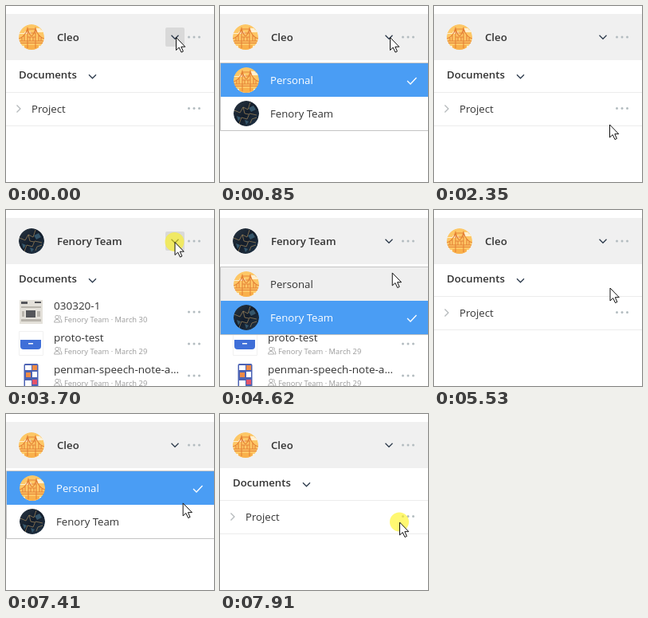
These frames come from a looping animation (261x221 px, 8000 ms). An HTML page:

```html
<!DOCTYPE html>
<html lang="en">
<head>
<meta charset="utf-8">
<title>Account switcher</title>
<style>
html, body { margin: 0; width: 100%; height: 100%; overflow: hidden; background: #fff; }
svg { display: block; width: 261px; height: 221px; font: 13.2px "Open Sans", "Noto Sans", sans-serif; fill: #333; }
.bold { font-weight: 600; }
.file { font-size: 13.5px; }
.note { font-size: 9.4px; fill: #9a9a9a; }
.line { fill: none; stroke: #2d3b4c; stroke-width: 1.3; }
.pale { stroke: #b4b8ba; }
.dots { fill: #b3bcc0; }
.rule { fill: #ececec; }
</style>
</head>
<body>
<svg viewBox="0 0 261 221">
  <defs>
    <clipPath id="disc"><circle r="16"/></clipPath>
    <linearGradient id="night" x2="1" y2="1">
      <stop stop-color="#2a3743"/><stop offset=".5" stop-color="#131d2b"/><stop offset="1" stop-color="#24384a"/>
    </linearGradient>
    <g id="bridge" clip-path="url(#disc)">
      <circle r="16" fill="#fdc766"/>
      <path d="M-16-5h7a3 3 0 0 1 5-2q4 0 4 3h-16zM4-9q1-3 4-2 3-1 4 2h4v3H3zM-16 11H16V16H-16z" fill="#fff0cf"/>
      <path d="M-9 10h18v6H-9z" fill="#f9b04b"/>
      <path d="M-16 5H16M-16 7.5H16M-5-12V14M5-12V14M-5-10H5M-5-5H5M-5 0H5M-16 2Q-8 0-5-11Q0 8 5-11Q8 0 16 2M-12 1V5M-9-2V5M-2 0V5M2 0V5M9-2V5M12 1V5" fill="none" stroke="#e58235" stroke-width="1.1"/>
    </g>
    <g id="marble" clip-path="url(#disc)">
      <circle r="16" fill="url(#night)"/>
      <path d="M-15-4l7 3 4-7 6 3 3-9M-9 13l3-8 7 2 3-7 9 2M-4-8l2 8 5 1M5 12l2-5 6-2" fill="none" stroke="#a58a5c" stroke-width=".7"/>
      <path d="M-12 3l5 2-3 5zM3-7l6-3 3 5-6 3zM-2 8l5 2-3 4z" fill="#35566b"/>
    </g>
    <g id="dots" class="dots"><circle cx="-6.5" r="1.5"/><circle r="1.5"/><circle cx="6.5" r="1.5"/></g>
    <path id="down" class="line" d="M-4.5-2.2L0 2.3 4.5-2.2"/>
    <g id="people" fill="none" stroke="#a5a5a5" stroke-width=".9">
      <circle cx="4" cy="-5.5" r="2.2"/><path d="M.5 1Q.5-2.6 4-2.6T7.5 1zM6.5-7.5q3 .5 1.3 3.6Q10-2.5 10 1H8.5"/>
    </g>
  </defs>

  <path fill="#f0f0f0" d="M0 10H261V68H0z"/>
  <rect id="button" x="200" y="27" width="24" height="24" rx="2" fill="#d9d9d9"/>
  <use href="#down" x="212" y="39"/>
  <use href="#dots" x="236" y="39"/>
  <text class="bold" x="16" y="91">Documents</text>
  <use href="#down" x="108.5" y="88.5"/>

  <g id="own">
    <use href="#bridge" x="32" y="39"/>
    <text class="bold" x="64" y="44">Cleo</text>
    <path class="rule" d="M0 108H261v1H0zM0 150H261v1H0z"/>
    <path class="line pale" d="M13.5 124.5l4.5 4.5-4.5 4.5"/>
    <text x="32" y="134">Project</text>
    <use href="#dots" x="236" y="128.5"/>
  </g>

  <g id="team">
    <use href="#marble" x="32" y="39"/>
    <text class="bold" x="64" y="44">Fenory Team</text>
    <g id="files"></g>
    <path d="M17 113H46V143H17z" fill="#e4e1da"/>
    <path d="M19 115h8v3h-8zM36 115h8v2h-8zM25 126h12v9H25z" fill="#55565a"/>
    <path d="M19 121h25v2H19zM19 137h25v3H19zM20 127h3v7h-3zM39 127h4v7h-4z" fill="#b9b5ad"/>
    <path d="M16.500 152.500H46.500V182.500H16.500z" fill="#fff" stroke="#f1f1f1"/>
    <path d="M18 163H44v8q0 4-4 4H22q-4 0-4-4z" fill="#3f6fd8"/>
    <path d="M28 167h6v1.500h-6z" fill="#fff"/>
    <rect x="22.500" y="193" width="18" height="32" rx="2" fill="#4b62b4"/>
    <path d="M24 195h8v6h-8zM33 203h6v7h-6zM24 214h8v7h-8z" fill="#fff"/>
    <path d="M33 195h6v6h-6zM25 204h6v6h-6z" fill="#ee8a45"/>
    <path d="M33 213h6v6h-6z" fill="#e5546a"/>
  </g>

  <g id="menu">
    <path d="M.5 71.500H262V156.500H.5z" fill="#fff" stroke="#c4c4c4"/>
    <rect id="hover" x="1" width="260" height="42" fill="#efefef"/>
    <rect id="chosen" x="1" width="260" height="42" fill="#4a9df4"/>
    <path id="check" fill="none" stroke="#fff" stroke-width="1.300" d="M235 0l4 4 7.500-8"/>
    <use href="#bridge" x="33" y="93"/>
    <use href="#marble" x="33" y="135"/>
    <text id="row0" x="63" y="98">Personal</text>
    <text id="row1" x="63" y="140">Fenory Team</text>
  </g>

  <circle id="press" r="12" fill="#fff314" fill-opacity=".6"/>
  <path id="cursor" d="M0 0V16L3.700 12.600 6.500 18.600 8.900 17.500 6.300 11.700H11.300z" fill="#fff" stroke="#111"/>
</svg>
<script>
const $ = id => document.getElementById(id);
const LOOP = 8000;
const presses = [[630, 850], [2200, 2350], [3700, 3940], [5260, 5400], [6450, 6700], [7860, LOOP]];
const opened = [[800, 2250], [3850, 5260], [6600, 7910]];
const teamTime = [[2710, 5400]];

// Cursor moves: start, end, target x, target y
const moves = [
  [1410, 1880, 220.5, 149], [2710, 3470, 212, 40.5], [4480, 4700, 218, 95],
  [4839, 4840, 221, 98], [5760, 6280, 212, 39.5], [7020, 7600, 225.5, 136]
];

$('files').innerHTML = [['030320-1', 30], ['proto-test', 29], ['penman-speech-note-a...', 29]]
  .map(([name, day], i) => `<g transform="translate(0 ${i * 40})">
    <text class="file" x="60" y="125">${name}</text>
    <use href="#people" x="60" y="140"/>
    <text class="note" x="73" y="141">Fenory Team · March ${day}</text>
    <use href="#dots" x="236" y="128"/></g>`).join('');

const within = (spans, t) => spans.some(([a, b]) => t >= a && t < b);
const show = (id, on) => $(id).style.display = on ? '' : 'none';
const place = (id, x, y) => $(id).setAttribute('transform', `translate(${x} ${y})`);
const ease = p => p * p * (3 - 2 * p);

function cursorAt(t) {
  let x = 213.5, y = 39.5;
  for (const [a, b, tx, ty] of moves) {
    const p = ease(Math.min(1, Math.max(0, (t - a) / (b - a))));
    x += (tx - x) * p;
    y += (ty - y) * p;
  }
  return [x, y];
}

function draw(now) {
  const t = now % LOOP;
  const [x, y] = cursorAt(t);
  const open = within(opened, t), team = within(teamTime, t);
  const row = Math.floor((y - 72) / 42), chosen = team ? 1 : 0;

  show('own', !team);
  show('team', team);
  show('menu', open);
  show('button', !open && x > 200 && x < 224 && y > 27 && y < 51);
  show('hover', row === 0 || row === 1);
  place('hover', 0, 72 + row * 42);
  place('chosen', 0, 72 + chosen * 42);
  place('check', 0, 94 + chosen * 42);
  for (const i of [0, 1]) $('row' + i).style.fill = i === chosen ? '#fff' : '';

  show('press', within(presses, t));
  place('press', x - .5, y - .5);
  place('cursor', x, y);
  requestAnimationFrame(draw);
}
draw(performance.now());
</script>
</body>
</html>
```
